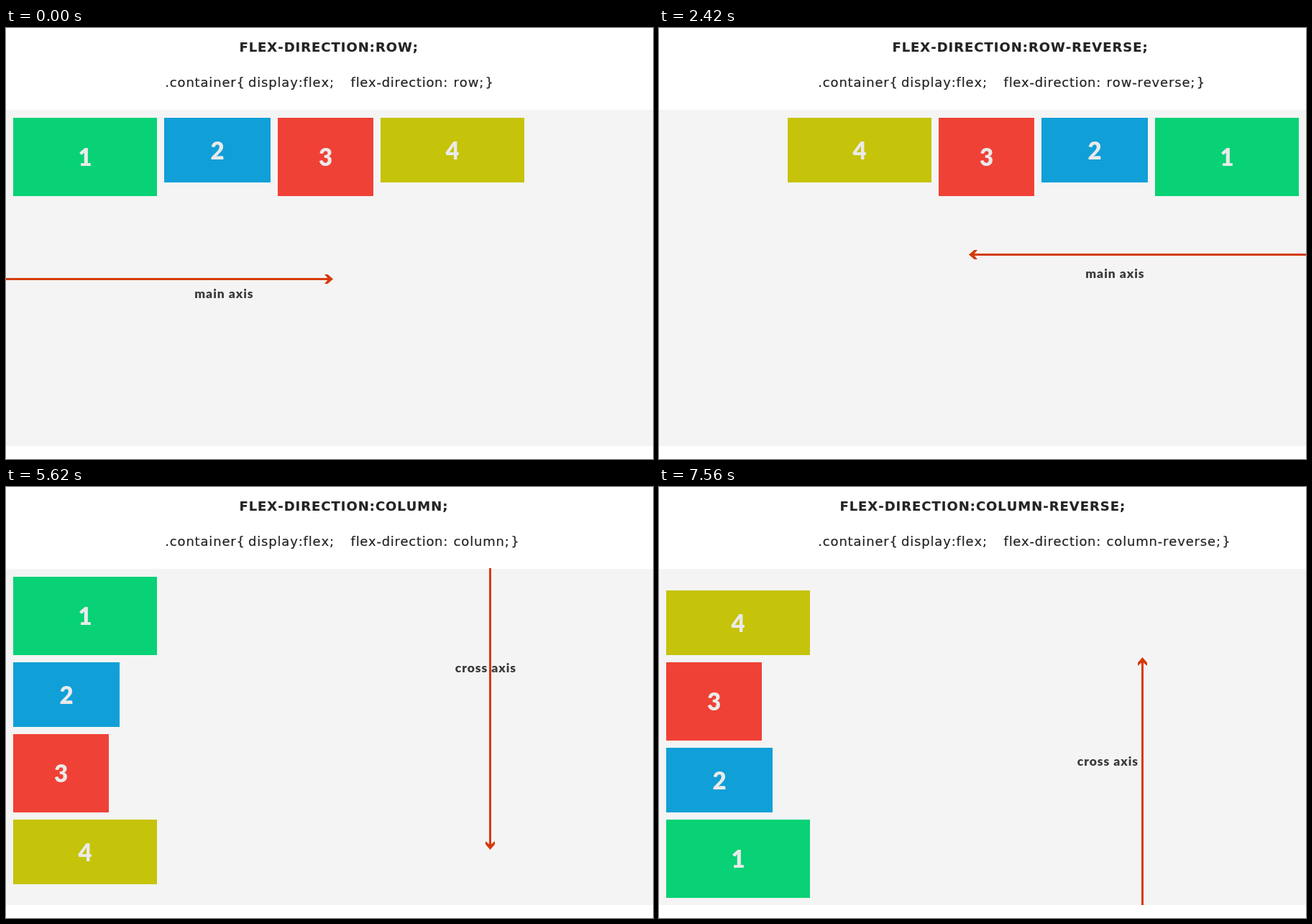
Animation of 900x600 px, one loop 8 s. Source, as an HTML page:

```html
<!DOCTYPE html>
<html lang="en">
<head>
<meta charset="utf-8">
<title>flex-direction</title>
<style>
  html, body { margin: 0; width: 100%; height: 100%; overflow: hidden; background: #fff; }
  #container {
    position: absolute; top: 114px; left: 0; width: 900px; height: 468px;
    box-sizing: border-box; padding: 11px 10px 10px;
    display: flex; gap: 10px; align-items: flex-start; background: #f4f4f4;
  }
  #container div {
    flex: none; text-align: center; color: #eaeaea;
    font: 900 33px Lato, sans-serif;
  }
  svg { position: absolute; top: 0; left: 0; }
  text {
    font: 18px "DejaVu Sans", sans-serif; font-kerning: none; letter-spacing: .82px;
    fill: #242426; stroke: #242426; stroke-width: .2px;
  }
  #title { font-weight: bold; letter-spacing: .97px; }
  #label {
    font: 900 17.5px Lato, sans-serif; letter-spacing: .95px; text-anchor: middle;
    fill: #3a3a3a; stroke: none;
  }
  #arrow { fill: #d63a09; }
</style>
</head>
<body>
<div id="container"></div>
<svg width="900" height="600">
  <text id="title" y="33"></text>
  <text y="82"><tspan x="221.3">.container{</tspan><tspan x="337">display:flex;</tspan><tspan
    x="479.6" letter-spacing=".7">flex-direction:</tspan><tspan id="value" x="622.6"></tspan><tspan dx="1.5">}</tspan></text>
  <g id="arrow">
    <rect id="shaft" y="-1.5" height="3"/>
    <path d="M-12-6.5h4.5L0 0l-7.5 6.5H-12L-6.5 0z"/>
  </g>
  <text id="label"></text>
</svg>
<script>
const LOOP = 8000;
const $ = id => document.getElementById(id);

const boxes = [[200, 109, '#08d275'], [148, 90, '#119fd8'], [133, 109, '#f04136'], [200, 90, '#c5c30a']];
boxes.forEach(([width, height, color], i) => {
  const box = document.createElement('div');
  box.textContent = i + 1;
  box.style.width = width + 'px';
  box.style.height = box.style.lineHeight = height + 'px';
  box.style.background = color;
  $('container').append(box);
});

// tip: arrow point and heading in degrees; label: text, centre and baseline
const scenes = [
  { start: 0, direction: 'row', titleX: 324.4, tip: [455, 349.5, 0], length: 455, label: ['main axis', 303.4, 376] },
  { start: 500, direction: 'row-reverse', titleX: 324.4, tip: [431, 315.5, 180], length: 469, label: ['main axis', 634.4, 348] },
  { start: 3700, direction: 'column', titleX: 324.4, tip: [673.5, 505, 90], length: 392, label: ['cross axis', 667.4, 258] },
  { start: 6900, direction: 'column-reverse', titleX: 251.4, tip: [672.5, 237, -90], length: 345, label: ['cross axis', 624.4, 388] },
];

function show({ direction, titleX, tip: [x, y, angle], length, label: [text, labelX, labelY] }) {
  $('container').style.flexDirection = direction;
  $('title').textContent = `FLEX-DIRECTION:${direction.toUpperCase()};`;
  $('title').setAttribute('x', titleX);
  $('value').textContent = direction + ';';
  $('arrow').setAttribute('transform', `translate(${x} ${y}) rotate(${angle})`);
  $('shaft').setAttribute('x', -length);
  $('shaft').setAttribute('width', length - 3);
  $('label').textContent = text;
  $('label').setAttribute('x', labelX);
  $('label').setAttribute('y', labelY);
}

let current;
function tick() {
  const time = performance.now() % LOOP;
  const scene = scenes.findLast(s => s.start <= time);
  if (scene !== current) show(current = scene);
  requestAnimationFrame(tick);
}
tick();
</script>
</body>
</html>
```
